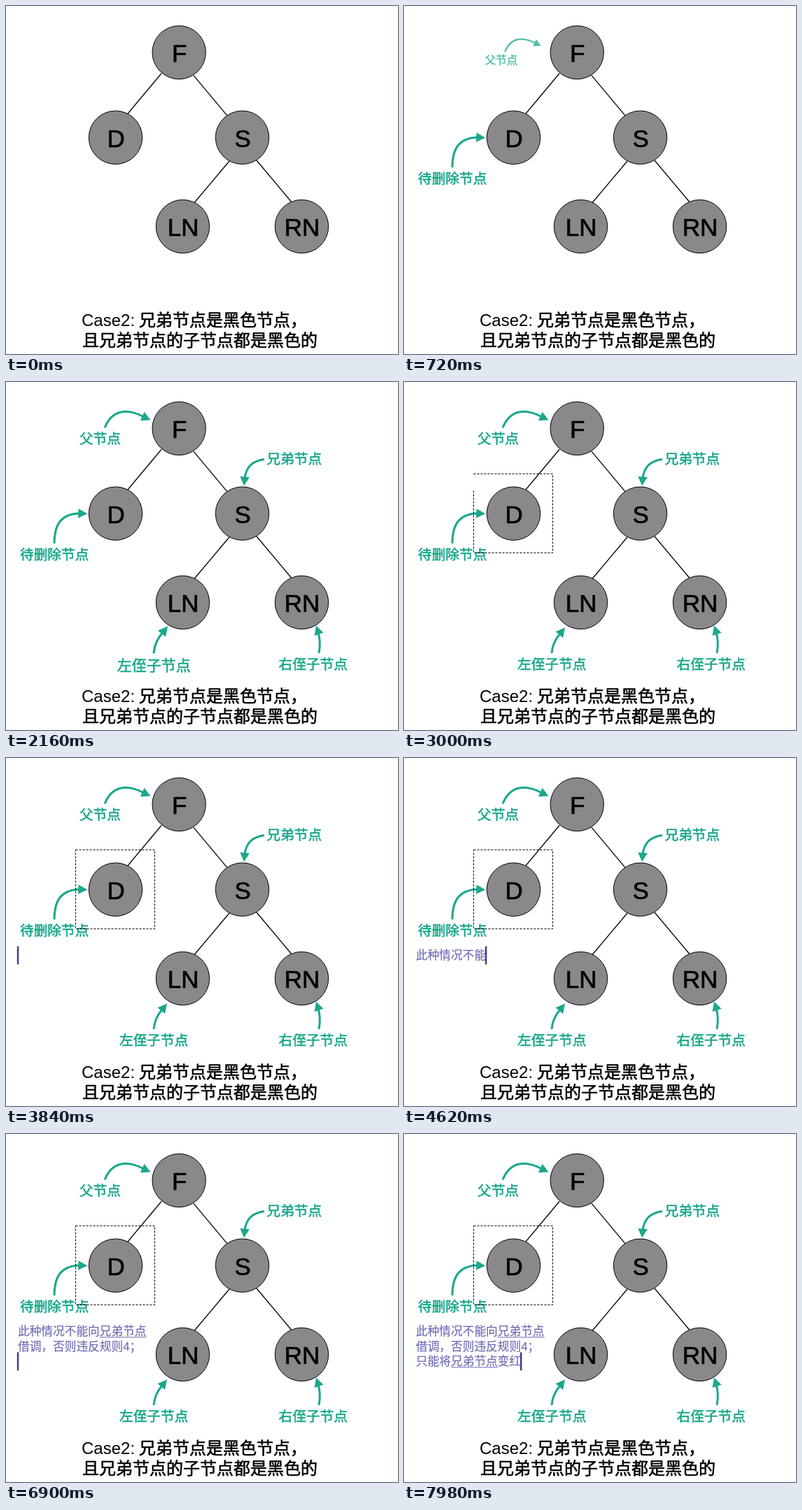
Write an HTML page that moves like this. It is 560 px wide and 498 px high and loops after 8 s.

```html
<!DOCTYPE html>
<html lang="zh-CN">
<head>
<meta charset="utf-8">
<style>
  html, body { margin: 0; width: 100%; height: 100%; overflow: hidden; background: #fff; }
  svg { display: block; width: 560px; height: 498px; }
  text { font-family: "Liberation Sans", "Noto Sans CJK SC", "Noto Sans CJK", sans-serif; stroke-linejoin: round; }
  .edge { stroke: #000; stroke-width: 1.3; }
  .node circle { fill: #898989; stroke: #000; }
  .node text { font-size: 35px; text-anchor: middle; stroke: #000; stroke-width: 0.7; }
  .caption { font-size: 24px; }
  .caption.han { stroke: #000; stroke-width: 0.6; }
  .label text { font-size: 19.7px; fill: #1aa88c; stroke: #1aa88c; stroke-width: 0.6; }
  .label path { fill: none; stroke: #1aa88c; stroke-width: 3; }
  .label polygon { fill: #1aa88c; }
  .note { font-size: 16.7px; fill: #6c69b4; stroke: #6c69b4; stroke-width: 0.15; }
  .mark { stroke: #6c69b4; stroke-width: 1; }
  .caret { fill: #3d3895; }
</style>
</head>
<body>
<svg id="stage" viewBox="0 0 560 498"></svg>
<script>
const LOOP = 8000, STEP = 60;
const stage = document.getElementById('stage');

function add(tag, attrs, parent = stage, content) {
  const el = document.createElementNS('http://www.w3.org/2000/svg', tag);
  for (const key in attrs) el.setAttribute(key, attrs[key]);
  if (content) el.textContent = content;
  parent.appendChild(el);
  return el;
}

// Tree
[[222, 96.5, 174, 154], [268, 99.3, 316, 156.8], [319, 222, 269, 281.5], [358, 221, 407.5, 280]]
  .forEach(([x1, y1, x2, y2]) => add('line', { x1, y1, x2, y2, class: 'edge' }));

[['F', 247.2, 66.5], ['D', 156.5, 188.2], ['S', 337.5, 188.2], ['LN', 252.5, 315.5], ['RN', 422.5, 315.5]]
  .forEach(([name, x, y]) => {
    const g = add('g', { class: 'node' });
    add('circle', { cx: x, cy: y, r: 38.2 }, g);
    add('text', { x: x + 0.6, y: y + 13.6 }, g, name);
  });

add('text', { x: 108, y: 458, class: 'caption' }, stage, 'Case2:');
add('text', { x: 190, y: 458, class: 'caption han' }, stage, '兄弟节点是黑色节点，');
add('text', { x: 109, y: 487, class: 'caption han' }, stage, '且兄弟节点的子节点都是黑色的');

// Labels with arrows; tip is [x, y, heading in degrees]
const labels = [
  { start: 150, text: '待删除节点', at: [20, 254], mid: [69, 218],
    path: 'M69 231C69 202 80 188.5 106 188', tip: [116.3, 188.5, 2] },
  { start: 600, text: '父节点', at: [105, 88], mid: [155.5, 66],
    path: 'M141 65.5C152 38 174 38 197 50', tip: [206.5, 54.5, 25] },
  { start: 1050, text: '兄弟节点', at: [372.5, 117], mid: [393, 124],
    path: 'M369 110.5C352 113 343 121 341 138', tip: [340, 148.5, 95] },
  { start: 1500, text: '右侄子节点', at: [389.5, 411], mid: [439, 382],
    path: 'M447 388C449 377 449 368 446 359', tip: [443, 348.5, 252] },
  { start: 1950, text: '左侄子节点', at: [162, 411], mid: [211.5, 382],
    path: 'M211 388C212 376 216 368 223 360', tip: [230, 351.5, 309] }
];
for (const label of labels) {
  const [x, y, angle] = label.tip;
  label.g = add('g', { class: 'label' });
  add('text', { x: label.at[0], y: label.at[1] }, label.g, label.text);
  add('path', { d: label.path }, label.g);
  add('polygon', { points: '0,0 -13,-6.8 -13,6.8', transform: `translate(${x} ${y}) rotate(${angle})` }, label.g);
}

// Dashed frame, revealed clockwise through a mask
const frame = 'M99.5 131.5H212.5V244.5H99.5Z';
const mask = add('mask', { id: 'reveal', maskUnits: 'userSpaceOnUse', x: 90, y: 120, width: 135, height: 135 });
const wipe = add('path', { d: frame, fill: 'none', stroke: '#fff', 'stroke-width': 4, pathLength: 100 }, mask);
const box = add('path', { d: frame, fill: 'none', stroke: '#000', 'stroke-dasharray': '3 2', mask: 'url(#reveal)' });

// Typed note
const LEFT = 17, EM = 16.7, KEY = '兄弟节点';
const lines = ['此种情况不能向兄弟节点', '借调，否则违反规则4；', '只能将兄弟节点变红'].map((text, i) => {
  const y = 288.4 + i * 21.5;
  return {
    text, y,
    el: add('text', { x: LEFT, y, class: 'note' }),
    mark: add('line', { y1: y + 2.5, y2: y + 2.5, class: 'mark' })
  };
});
const caret = add('rect', { width: 2.4, height: 26, class: 'caret' });

const clamp = v => Math.max(0, Math.min(1, v));
const ease = p => (1 - Math.cos(Math.PI * clamp(p))) / 2;

function popScale(ms) {
  return ms < 180 ? 1.07 * Math.pow(Math.max(0, ms) / 180, 0.75) : 1.07 - 0.07 * ease((ms - 180) / 180);
}

function typeNote(t) {
  let left = Math.max(0, Math.floor((t - 3800) / 125));
  for (const line of lines) {
    const size = line.text.length;
    const n = Math.max(0, Math.min(size, left));
    line.el.textContent = line.text.slice(0, n);
    const from = line.text.indexOf(KEY);
    const marked = from < 0 ? 0 : Math.max(0, Math.min(KEY.length, n - from));
    line.mark.setAttribute('x1', LEFT + from * EM);
    line.mark.setAttribute('x2', LEFT + (from + marked) * EM);
    line.mark.setAttribute('visibility', marked ? 'visible' : 'hidden');
    if (left >= 0) {
      caret.setAttribute('x', LEFT - 1.2 + (n ? line.el.getComputedTextLength() : 0));
      caret.setAttribute('y', line.y - 19);
    }
    left -= size + 1; // the line break takes a keystroke
  }
  caret.setAttribute('visibility', t >= 3240 ? 'visible' : 'hidden');
}

function draw(t) {
  for (const { g, start, mid: [x, y] } of labels) {
    const ms = t - start;
    g.setAttribute('transform', `translate(${x} ${y}) scale(${popScale(ms)}) translate(${-x} ${-y})`);
    g.setAttribute('opacity', clamp(ms / 160));
    g.setAttribute('visibility', ms > 0 ? 'visible' : 'hidden');
  }
  const drawn = ease((t - 2400) / 700) * 100;
  wipe.setAttribute('stroke-dasharray', drawn >= 100 ? 'none' : `${drawn} 200`);
  box.setAttribute('visibility', drawn > 0 ? 'visible' : 'hidden');
  typeNote(t);
}

const origin = performance.now();
function tick() {
  const t = (performance.now() - origin) % LOOP;
  draw(Math.floor(t / STEP) * STEP);
  requestAnimationFrame(tick);
}
tick();
</script>
</body>
</html>
```
